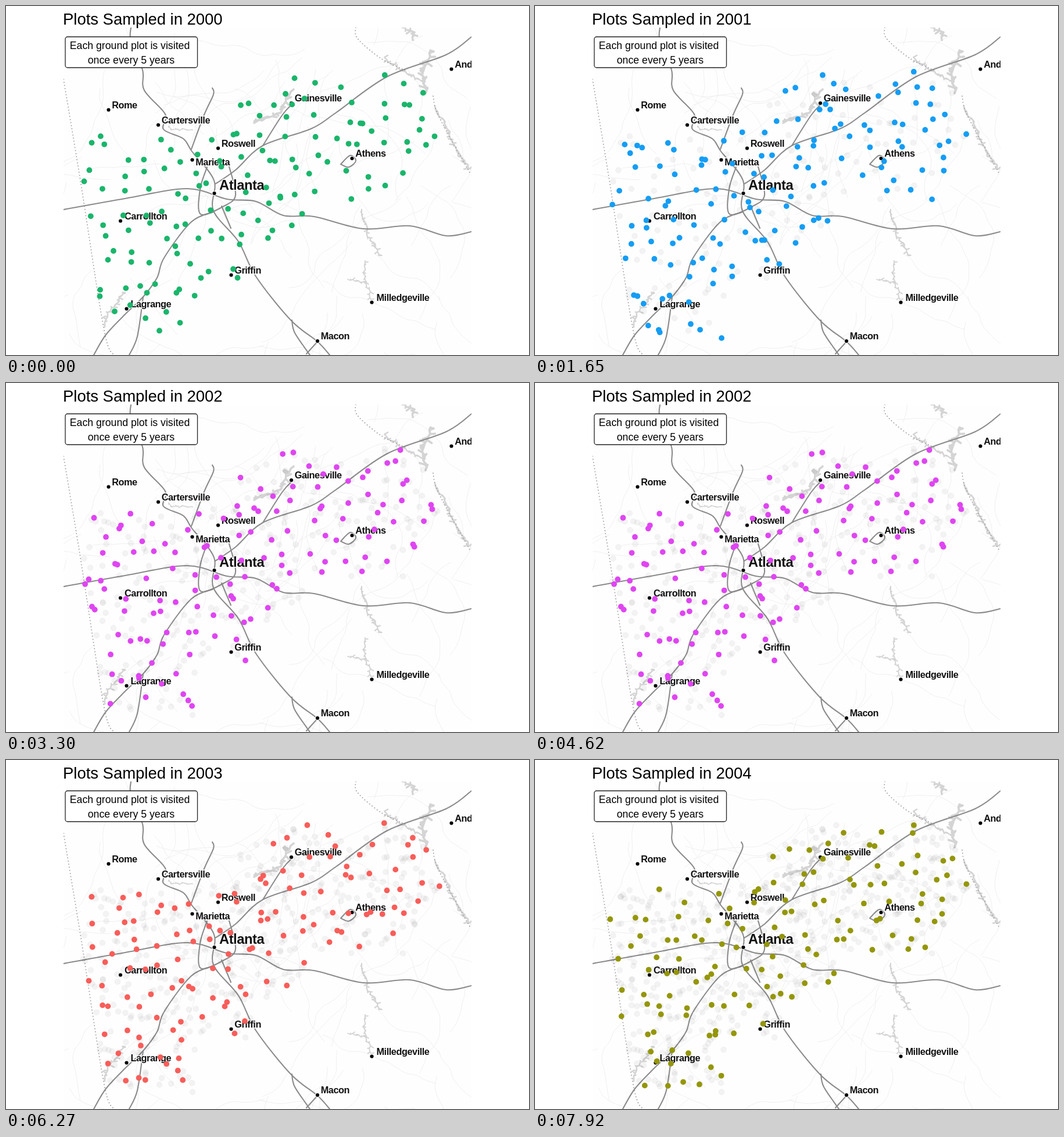
Animation of 900x600 px, one loop 8 s. Source, as an HTML page:

```html
<!DOCTYPE html>
<html lang="en">
<head>
<meta charset="utf-8">
<title>Plots Sampled</title>
<style>
  html, body { margin: 0; width: 100%; height: 100%; overflow: hidden; background: #fff; }
  svg { display: block; width: 900px; height: 600px; }
  text { font-family: "Liberation Sans", Arial, sans-serif; }
  path { fill: none; stroke-linecap: round; stroke-linejoin: round; }
  .minor { stroke: #f0f0f0; stroke-width: 1; }
  .lake { stroke: #d4d4d4; }
  .border { stroke: #a2a2a2; stroke-width: 1.9; stroke-dasharray: .1 5.3; }
  .road { stroke: #8b8b8b; stroke-width: 2.1; }
  .city { font-weight: bold; font-size: 16.3px; letter-spacing: -.45px; fill: #111;
          stroke: #fff; stroke-width: 3px; stroke-linejoin: round; paint-order: stroke; }
  .town { fill: #000; stroke: #fff; stroke-width: 2px; paint-order: stroke; }
  .future { display: none; }
  .past { fill: rgba(0,0,0,.045); stroke: rgba(0,0,0,.035); stroke-width: 1; }
</style>
</head>
<body>
<svg viewBox="0 0 900 600">
  <clipPath id="frame"><rect x="99" y="37" width="702" height="563"/></clipPath>
  <g id="map" clip-path="url(#frame)"><rect x="99" y="37" width="702" height="563" fill="#fefefe"/></g>
  <g id="plots"></g>
  <text id="title" x="98" y="32" font-size="27.45"></text>
  <rect x="102" y="53" width="227.5" height="53" rx="4" fill="#fff" stroke="#222" stroke-width="1.3"/>
  <g font-size="17.7" text-anchor="middle">
    <text x="213" y="74">Each ground plot is visited</text>
    <text x="215.5" y="99">once every 5 years</text>
  </g>
</svg>
<script>
const LOOP = 8000, YEAR_MS = 1650, FIRST_YEAR = 2000;
const COLORS = ['#1ab56b', '#149df4', '#df45f1', '#f85d59', '#949608'];

const map = document.getElementById('map');
const plots = document.getElementById('plots');
const title = document.getElementById('title');

function add(parent, tag, attrs, text) {
  const node = document.createElementNS('http://www.w3.org/2000/svg', tag);
  for (const key in attrs) node.setAttribute(key, attrs[key]);
  if (text) node.textContent = text;
  return parent.appendChild(node);
}

function seeded(seed) {
  return () => {
    seed = seed + 0x6D2B79F5 | 0;
    let t = Math.imul(seed ^ seed >>> 15, 1 | seed);
    t = t + Math.imul(t ^ t >>> 7, 61 | t) ^ t;
    return ((t ^ t >>> 14) >>> 0) / 4294967296;
  };
}

const rnd = seeded(12);
const spread = size => (rnd() - .5) * size;
const parse = s => s.split(' ').map(p => p.split(',').map(Number));

// Catmull-Rom spline through the points
function smooth(pts) {
  let d = 'M' + pts[0];
  for (let i = 0; i < pts.length - 1; i++) {
    const b = pts[i], c = pts[i + 1], a = pts[i - 1] || b, e = pts[i + 2] || c;
    const handle = (p, from, to) => p.map((v, k) => v + (to[k] - from[k]) / 6);
    d += `C${handle(b, a, c)} ${handle(c, e, b)} ${c}`;
  }
  return d;
}

const line = (cls, s) => add(map, 'path', { class: cls, d: smooth(parse(s)) });

// Faint back roads wander from random places
for (let i = 0; i < 80; i++) {
  let x = 99 + rnd() * 702, y = 37 + rnd() * 563, heading = rnd() * 2 * Math.PI;
  const pts = [[x, y]];
  for (let n = 5 + rnd() * 9; n > 0; n--) {
    heading += spread(.9);
    x += 18 * Math.cos(heading);
    y += 18 * Math.sin(heading);
    pts.push([x, y]);
  }
  add(map, 'path', { class: 'minor', d: smooth(pts) });
}

// Ragged reservoirs: a jittered spine with short side inlets
function lake(width, s) {
  const pts = parse(s);
  let d = 'M' + pts[0];
  for (let i = 1; i < pts.length; i++) {
    const [ax, ay] = pts[i - 1], [bx, by] = pts[i];
    const steps = Math.ceil(Math.hypot(bx - ax, by - ay) / 5);
    for (let k = 1; k <= steps; k++) {
      const dx = spread(width * 5), dy = spread(width * 3);
      d += `L${ax + (bx - ax) * k / steps + spread(5)} ${ay + (by - ay) * k / steps + spread(4)}`
         + `l${dx} ${dy}l${-dx} ${-dy}`;
    }
  }
  add(map, 'path', { class: 'lake', d, 'stroke-width': width });
}
lake(3.6, '427,201 472,183 488,148');
lake(3.8, '722,150 718,115 732,78');
lake(2.4, '718,130 680,108 650,90');
lake(3.2, '682,37 702,44 698,58');
lake(2.7, '738,172 757,205 770,240 800,282');
lake(2.3, '612,350 624,396 646,430');
lake(2, '618,438 616,465 630,506');
lake(1.8, '588,470 618,476');
lake(2.5, '170,552 173,532 204,492');
lake(1.5, '280,206 288,214 318,212');

line('border', '99,126 128,300 168,553 185,600');
line('border', '602,37 605,56 645,90 690,112');
line('border', '735,155 745,190 800,290');

[
  '215,37 215,60 235,110 238,145 274,186 271,212 305,228 320,250 358,300 357,352 400,405 430,465 490,540 536,577 557,600',
  '355,141 357,152 341,187 319,246',
  '801,53 757,84 655,122 567,184 525,211 442,240 395,282 360,306',
  '442,240 475,188 494,167',
  '346,277 334,315 335,358 375,344 395,325 384,276',
  '99,350 205,331 312,314 380,332 430,336 477,360 530,362 615,383 695,378 757,395 801,388',
  '357,354 318,372 272,433 260,467 236,500 205,530 172,565 151,600',
  '236,500 226,568 212,600',
  '371,344 387,382',
  '492,540 497,562 523,600',
  '536,577 517,598',
  '576,272 592,257 602,266 590,277 576,272'
].forEach(s => line('road', s));

function city(name, x, y, { dx = 5.7, dy = -3, size = 16.3 } = {}) {
  add(map, 'circle', { class: 'town', cx: x, cy: y, r: 3.1 });
  add(map, 'text', { class: 'city', x: x + dx, y: y + dy, style: `font-size:${size}px` }, name);
}
city('Rome', 176.5, 178.5);
city('Cartersville', 262, 204.5);
city('Roswell', 365, 244.5);
city('Marietta', 320.5, 264.5, { dy: 9.5 });
city('Gainesville', 491, 167);
city('Athens', 595.5, 262);
city('Carrollton', 197, 369.5, { dx: 7 });
city('Atlanta', 358.5, 322, { dx: 8.5, dy: -6, size: 23.7 });
city('Griffin', 387.5, 462.5);
city('Lagrange', 207.5, 520.5, { dx: 7 });
city('Milledgeville', 629.5, 509.5, { dx: 8 });
city('Macon', 536, 576);
city('And', 766.5, 108.5);

// One jittered plot per cell of a triangular lattice, kept inside the survey area
const area = new Path2D('M158,219 129,250 128,332 168,552 184,564 322,571 326,490 348,464 415,478 430,426 516,386 512,328 684,338 710,266 756,234 728,150 664,99 585,126 508,106 392,164 390,205 315,228Z');
const ctx = document.createElement('canvas').getContext('2d');
const CELL = 37, ROW = CELL * Math.sqrt(3) / 2, JITTER = 35;

const years = COLORS.map((fill, year) => {
  const random = seeded(71 + year * 37);
  const group = add(plots, 'g', { fill });
  const left = 90 + random() * CELL, top = 85 + random() * ROW;
  for (let row = 0; row < 16; row++) {
    for (let col = 0; col < 19; col++) {
      const cx = left + (col + row % 2 / 2) * CELL + (random() - .5) * JITTER;
      const cy = top + row * ROW + (random() - .5) * JITTER;
      if (ctx.isPointInPath(area, cx, cy)) add(group, 'circle', { cx, cy, r: 4.9 });
    }
  }
  return group;
});

function draw() {
  const current = Math.floor(performance.now() % LOOP / YEAR_MS);
  title.textContent = `Plots Sampled in ${FIRST_YEAR + current}`;
  years.forEach((group, year) => {
    group.setAttribute('class', year < current ? 'past' : year > current ? 'future' : 'now');
  });
  requestAnimationFrame(draw);
}
draw();
</script>
</body>
</html>
```
